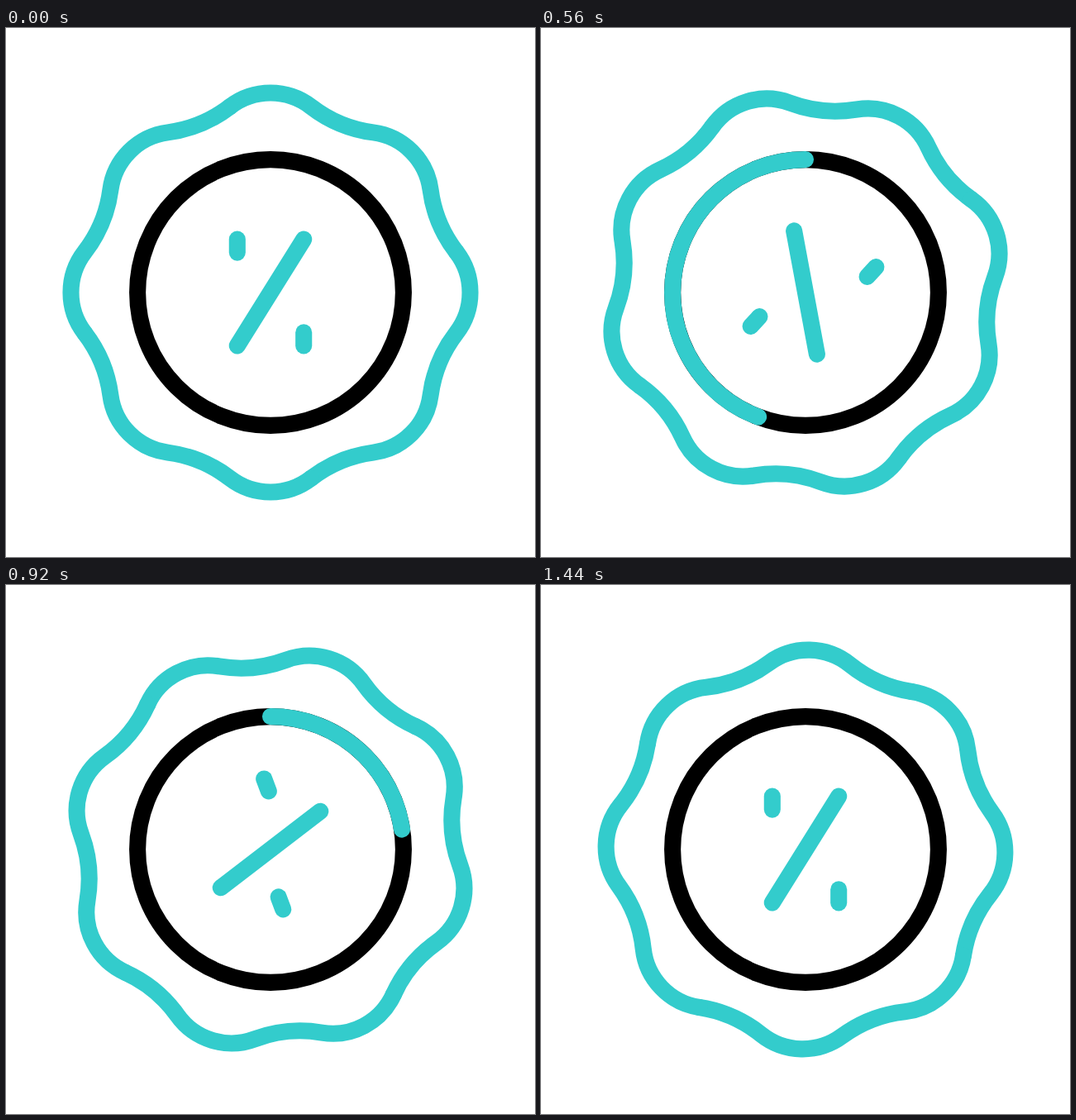
An HTML page without scripts that plays this animation: 640 by 640 pixels, repeating every 1480 ms.

```html
<!DOCTYPE html>
<html lang="en">
<head>
<meta charset="utf-8">
<title>Discount badge</title>
<style>
  @property --f { syntax: "<number>"; inherits: true; initial-value: 0; }

  html, body { margin: 0; width: 100%; height: 100%; overflow: hidden; background: #fff; }

  svg {
    display: block;
    width: 100%;
    height: 100%;
    fill: none;
    stroke: #3cc;
    stroke-width: 20.1;
    stroke-linecap: round;
    animation: tick 1480ms steps(37) -2ms infinite;
  }

  /* --f counts 40 ms ticks; everything else is derived from it */
  @keyframes tick { from { --f: 0; } to { --f: 37; } }

  .stage {
    /* linear progress of each move */
    --t-turn: clamp(0, (var(--f) - 8) / 19, 1);
    --t-head: clamp(0, (var(--f) - 8) / 13, 1);
    --t-tail: clamp(0, (var(--f) - 14) / 13, 1);
    --t-out: clamp(0, (var(--f) - 8) / 9, 1);
    --t-back: clamp(0, (var(--f) - 17) / 10, 1);

    /* the same, eased in and out */
    --turn: calc(var(--t-turn) * var(--t-turn) * (3 - 2 * var(--t-turn)));
    --head: calc(var(--t-head) * var(--t-head) * (3 - 2 * var(--t-head)));
    --tail: calc(var(--t-tail) * var(--t-tail) * (3 - 2 * var(--t-tail)));
    --out: calc(var(--t-out) * var(--t-out) * (3 - 2 * var(--t-out)));
    --back: calc(var(--t-back) * var(--t-back) * (3 - 2 * var(--t-back)));

    /* sideways swing of the two curved legs */
    --bend-out: calc(var(--out) * (1 - var(--out)));
    --bend-back: calc(var(--back) * (1 - var(--back)));
  }

  .badge { transform: rotate(calc(var(--f) * -45deg / 37)); }
  .slash { transform: rotate(calc(var(--turn) * -180deg)); }

  .sweep {
    stroke-dasharray: calc((var(--head) - var(--tail)) * 360px) 720px;
    stroke-dashoffset: calc(var(--tail) * -360px);
    opacity: calc((var(--head) - var(--tail)) * 1000);
  }

  .pill { transform: translate(var(--x), var(--y)) rotate(calc(var(--turn) * 180deg)); }
  .left {
    --x: calc(-40.2px - var(--out) * .1px - var(--bend-out) * 107.8px + var(--back) * 80.5px + var(--bend-back) * 2.6px);
    --y: calc(-56.4px + var(--out) * 117.6px + var(--bend-out) * 22.4px - var(--back) * 4.8px + var(--bend-back) * 30px);
  }
  .right {
    --x: calc(40.2px + var(--out) * 27px + var(--bend-out) * 103px - var(--back) * 107.4px - var(--bend-back) * 11.4px);
    --y: calc(56.4px - var(--out) * 113.4px + var(--bend-out) * 13.5px + var(--back) * .6px - var(--bend-back) * 94px);
  }
</style>
</head>
<body>
<svg viewBox="0 0 640 640">
  <defs>
    <path id="quarter" d="M-49.1-224.8A80.5 80.5 0 0 1 49.1-224.8A156.5 156.5 0 0 0 124.2-193.6A80.5 80.5 0 0 1 193.6-124.2A156.5 156.5 0 0 0 224.8-49.1"/>
    <path id="pill" d="M0-8V8"/>
  </defs>
  <g transform="translate(320 320)">
    <g class="stage">
      <g class="badge">
        <use href="#quarter"/>
        <use href="#quarter" transform="rotate(90)"/>
        <use href="#quarter" transform="rotate(180)"/>
        <use href="#quarter" transform="rotate(270)"/>
      </g>
      <circle r="160.9" stroke="#000"/>
      <path class="sweep" pathLength="360" d="M0-160.9A160.9 160.9 0 0 0 0 160.9A160.9 160.9 0 0 0 0-160.9"/>
      <path class="slash" d="M40.2-64.4L-40.2 64.4"/>
      <g class="pill left"><use href="#pill"/></g>
      <g class="pill right"><use href="#pill"/></g>
    </g>
  </g>
</svg>
</body>
</html>
```
